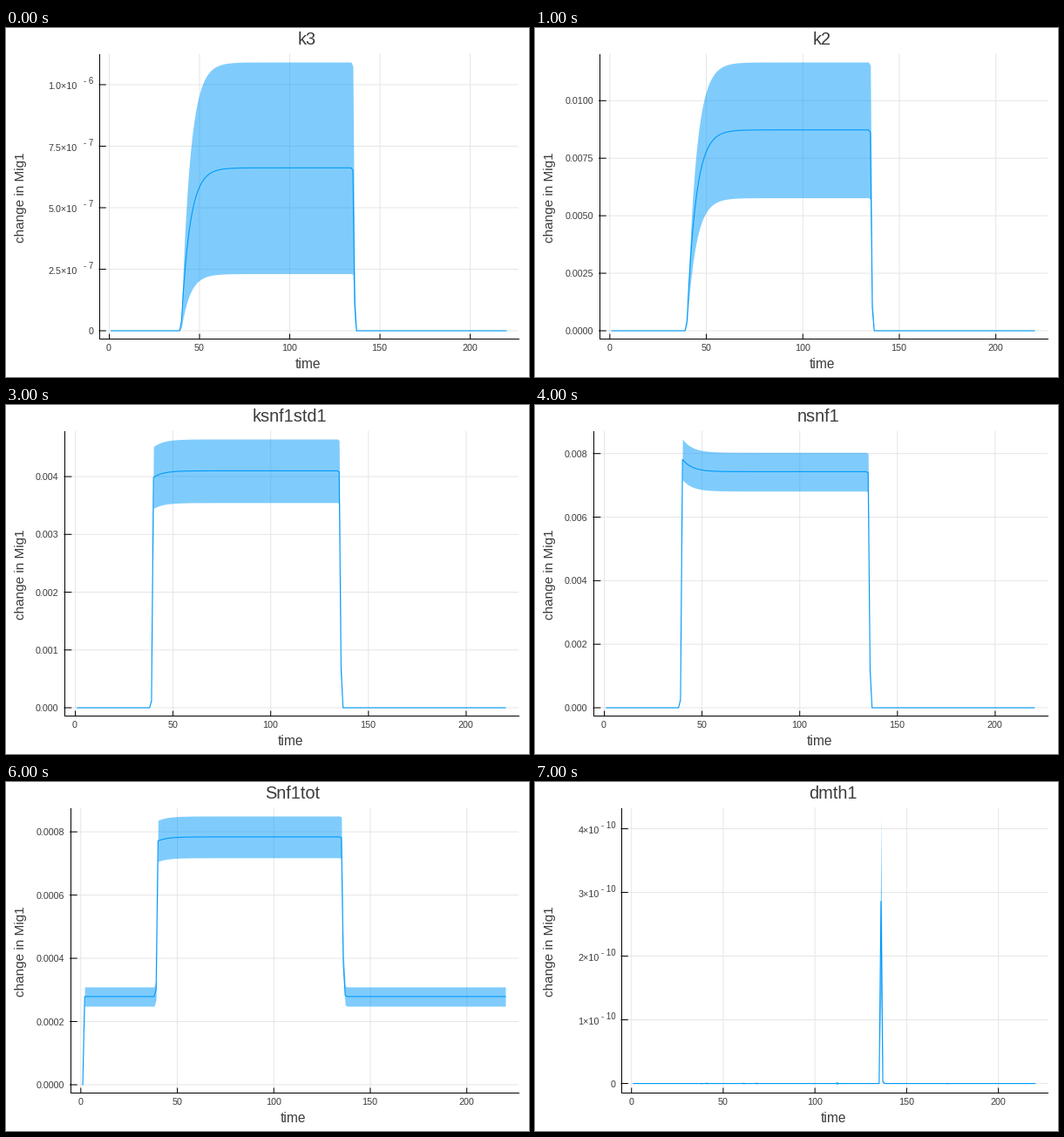
Recreate the animation shown at these times as a matplotlib script. Size 600 px wide and 400 px high, loop 8000 ms.

```python
import numpy as np
import matplotlib.pyplot as plt
from matplotlib.animation import FuncAnimation

W, H, DPI = 600, 400, 100
PX = 72 / DPI
TOP, BOTTOM, RIGHT = 30, 356, 587.5
Y_LOW, Y_SPAN = 347, 308      # pixel row of the smallest value, height of the data
BLUE, INK, GRID = "#009afa", "#3c3c3c", "#e6e6e6"
T = np.arange(1, 221)

plt.rcParams["font.family"] = "Liberation Sans"


def pulse(start, tau, lead=0.0, end=0.995, tail=0.16):
    """Step between t=40 and t=135, settling from `start` towards 1."""
    p = np.where((T >= 40) & (T <= 135),
                 1 + (start - 1) * np.exp(-(T - 40) / tau), 0.0)
    p[T == 39] = lead
    p[T == 135] *= end
    p[T == 136] = tail
    return p


def scaled(mid, dev, p):
    return mid * p, dev * p


def on_base():
    p = pulse(0.975, 5, lead=0.044, tail=0.21)
    p[T == 137] = 0.006
    mid, dev = 2.79 + 5.05 * p, 0.305 + 0.355 * p
    mid[0] = dev[0] = 0
    return mid, dev


def spike():
    mid, dev = np.zeros(T.size), np.full(T.size, 0.001)
    for t, m, d in [(38, 0, .008), (41, .004, .014), (61, .003, .013),
                    (68, .003, .014), (112, .006, .026), (136, 2.86, 1.34),
                    (137, .03, .02), (172, 0, .008)]:
        mid[T == t], dev[T == t] = m, d
    return mid, dev


def fixed(digits, unit):
    return lambda v: f"{v * unit:.{digits}f}"


def power(digits, exponent):
    """Mantissa and exponent; values from 10 up move to the next power."""
    def label(v):
        if v == 0:
            return "0"
        m, e = (v / 10, exponent - 1) if v >= 10 else (v, exponent)
        return f"{m:.{digits}f}×10", f"- {e}"
    return label


# title, left edge, (mid, deviation), tick step, tick label
PLOTS = [
    ("k3", 107, scaled(6.62, 4.30, pulse(0.06, 4.8, end=0.985)), 2.5, power(1, 7)),
    ("k2", 73.5, scaled(8.73, 2.95, pulse(0.05, 4.6, end=0.987, tail=0.115)), 2.5,
     fixed(4, 1e-3)),
    ("ksnf1", 57, scaled(227.7, 27.4, pulse(0.972, 5, lead=0.026)), 50, fixed(0, 1)),
    ("ksnf1std1", 67, scaled(4.1, 0.55, pulse(0.972, 5, lead=0.03)), 1, fixed(3, 1e-3)),
    ("nsnf1", 67, scaled(7.43, 0.61, pulse(1.052, 5, lead=0.035)), 2, fixed(3, 1e-3)),
    ("nsnf2", 61, scaled(4.1, 0.4, pulse(1.05, 5, lead=0.035)), 1, fixed(2, 1e-2)),
    ("Snf1tot", 73.5, on_base(), 2, fixed(4, 1e-4)),
    ("dmth1", 99, spike(), 1, power(0, 10)),
]

fig = plt.figure(figsize=(W / DPI, H / DPI), dpi=DPI, facecolor="white")
ax = fig.add_axes([0, 0, 1, 1])


def text(x, y, s, size, **kw):
    kw = {"ha": "center", "va": "baseline", "color": INK, **kw}
    ax.text(x, y, s, fontsize=size * PX, **kw)


def line(xs, ys, color="black", width=1, **kw):
    ax.plot(xs, ys, color=color, lw=width * PX, **kw)


def draw(i):
    title, left, (mid, dev), step, label = PLOTS[i]
    ax.clear()
    ax.set(xlim=(0, W), ylim=(H, 0))
    ax.axis("off")

    lo, hi = min(0, (mid - dev).min()), (mid + dev).max()
    unit = (RIGHT - left) / (219 * 1.06)

    def to_x(t):
        return left + (t - 1 + 219 * 0.03) * unit

    def to_y(v):
        return Y_LOW - (v - lo) / (hi - lo) * Y_SPAN

    # grid, inward ticks and their labels
    tick = dict(zorder=5, snap=False)
    for t in np.arange(0, 201, 50):
        x = to_x(t)
        line([x, x], [TOP, BOTTOM], GRID, snap=False)
        line([x, x], [BOTTOM, BOTTOM - 5], **tick)
        text(x - 0.5, 370, str(t), 10.7)
    for v in np.arange(0, hi * 1.02, step):
        y = to_y(v)
        line([left, RIGHT], [y, y], GRID, snap=False)
        line([left, left + (RIGHT - left) * 0.015], [y, y], **tick)
        s = label(v)
        if isinstance(s, tuple):
            text(left - 25.5, y + 5.2, s[0], 10.8, ha="right")
            text(left - 6.8, y - 0.8, s[1], 9.7, ha="right")
        else:
            text(left - 6.5, y + 4, s, 10.7, ha="right")

    xs = to_x(T)
    ax.fill_between(xs, to_y(mid - dev), to_y(mid + dev),
                    color=BLUE, alpha=0.5, lw=0, zorder=3)
    line(xs, to_y(mid), BLUE, 1.1, zorder=4)

    line([left, left], [TOP, BOTTOM], zorder=5)
    line([left, RIGHT], [BOTTOM, BOTTOM], zorder=5)

    center = (left + RIGHT) / 2
    text(center - 1.8, 19, title, 20)
    text(center - 1, 390, "time", 15.5)
    text(20.9, 194.3, "change in Mig1", 15.2, rotation=90, rotation_mode="anchor")
    return []


anim = FuncAnimation(fig, draw, frames=len(PLOTS), interval=1000,
                     init_func=lambda: [], repeat=True, repeat_delay=0)
plt.show()
```
